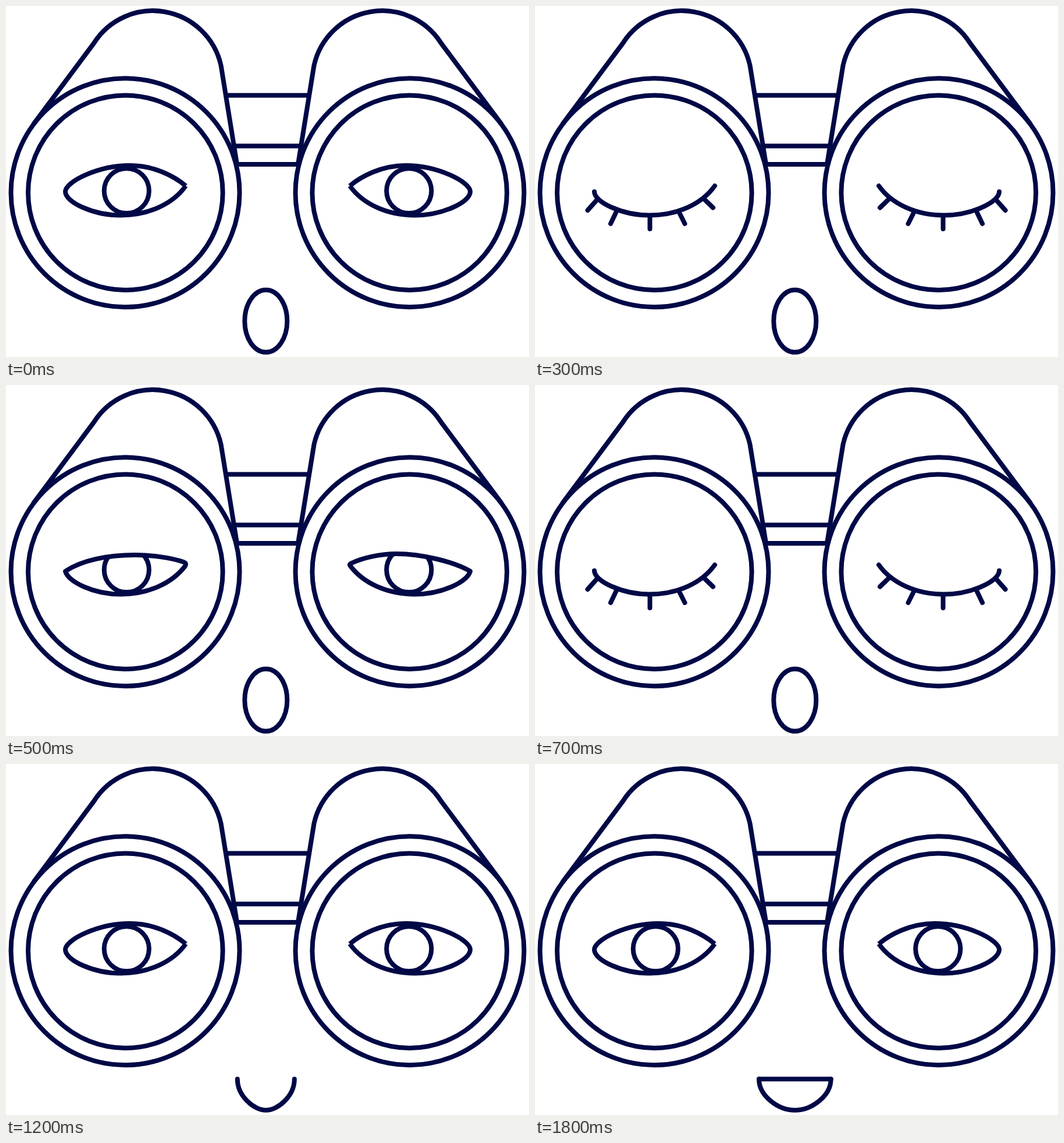
Animation, 899 px wide and 603 px high, one loop 8 s. Source, as an HTML page:

```html
<!DOCTYPE html>
<html lang="en">
<head>
<meta charset="utf-8">
<title>Binoculars</title>
<style>
  html, body { margin: 0; width: 100%; height: 100%; overflow: hidden; background: #fff; }
  svg { display: block; width: 100%; height: 100%; }
  .ink { fill: none; stroke: #000846; stroke-width: 8; stroke-linecap: round; stroke-linejoin: round; }
  .butt { stroke-linecap: butt; }

  /* Every pose is switched hard; 1.25% is 100 ms. */
  .pose { visibility: hidden; animation: 8s step-end infinite; }
  .open { animation-name: open; }
  .half { animation-name: half; }
  .low { animation-name: low; }
  .shut { animation-name: shut; }
  .gasp { animation-name: gasp; }
  .smile1 { animation-name: smile1; }
  .smile2 { animation-name: smile2; }
  .smile3 { animation-name: smile3; }
  .smile4 { animation-name: smile4; }
  .teeth { animation-name: teeth; }

  @keyframes open { 0%, 10%, 100% { visibility: visible } 1.25% { visibility: hidden } }
  @keyframes half { 0%, 2.5%, 7.5%, 100% { visibility: hidden } 1.25%, 6.25% { visibility: visible } }
  @keyframes low { 0%, 3.75%, 6.25%, 8.75%, 100% { visibility: hidden } 2.5%, 5%, 7.5% { visibility: visible } }
  @keyframes shut { 0%, 5%, 10%, 100% { visibility: hidden } 3.75%, 8.75% { visibility: visible } }
  @keyframes gasp { 0% { visibility: visible } 10%, 100% { visibility: hidden } }
  @keyframes smile1 { 0%, 12.5%, 100% { visibility: hidden } 10% { visibility: visible } }
  @keyframes smile2 { 0%, 15%, 100% { visibility: hidden } 12.5% { visibility: visible } }
  @keyframes smile3 { 0%, 17.5%, 100% { visibility: hidden } 15% { visibility: visible } }
  @keyframes smile4 { 0% { visibility: hidden } 17.5%, 100% { visibility: visible } }
  @keyframes teeth { 0% { visibility: hidden } 22.5%, 100% { visibility: visible } }
</style>
</head>
<body>
<svg viewBox="0 0 899 603" preserveAspectRatio="none">
  <defs>
    <g id="tube">
      <circle cx="205" cy="320.7" r="196.5"/>
      <circle cx="205.3" cy="320.7" r="167.3"/>
      <path d="M48 202L151 64A120 120 0 0 1 369.500 102L397 272"/>
    </g>
    <circle id="pupil" cx="207.300" cy="317.500" r="38.600"/>
    <path id="eyeOpen" d="M309 309C290 293 255 274 213 274C158 274 102 302 102 319C102 337 150 359.500 197 359.500C245 359.500 287 340 309 309"/>
    <path id="eyeHalfL" d="M102 320C130 301 175 292 222 292C250 292 285 297 305 304Q311 306 308 311C286 340 245 359.500 197 359.500C150 359.500 107 338 102 320Z"/>
    <path id="eyeHalfR" d="M102 320C129 304 185 290 229 290C257 290 287 297 306 306Q311 308 308 311C286 340 245 359.500 197 359.500C150 359.500 107 338 102 320Z"/>
    <path id="eyeLow" d="M102 320C135 322 170 324 205 324C245 324 280 318 309 309C287 340 245 359.500 197 359.500C150 359.500 107 338 102 320Z"/>
    <path id="eyeShut" d="M102 319C102 337 150 359.500 197 359.500C245 359.500 287 340 309 309"/>
    <path id="lashes" d="M106.500 333L90.500 351M140 353L130 374M197.500 360V383M247 353L257.500 374M291 332L306 346.500"/>
    <clipPath id="clipHalfL"><use href="#eyeHalfL"/></clipPath>
    <clipPath id="clipHalfR"><use href="#eyeHalfR"/></clipPath>
    <clipPath id="clipLow"><use href="#eyeLow"/></clipPath>
    <g id="lowEye">
      <use href="#pupil" clip-path="url(#clipLow)"/>
      <use href="#eyeLow"/>
    </g>
  </defs>

  <g class="ink">
    <use href="#tube"/>
    <use href="#tube" transform="translate(899) scale(-1 1)"/>
    <path class="butt" d="M378 153.500H521M391 240.500H508M397 272H502"/>

    <g class="pose open butt">
      <use href="#pupil"/>
      <use href="#eyeOpen"/>
      <g transform="translate(900) scale(-1 1)">
        <use href="#pupil"/>
        <use href="#eyeOpen"/>
      </g>
    </g>
    <g class="pose half">
      <use href="#pupil" clip-path="url(#clipHalfL)"/>
      <use href="#eyeHalfL"/>
      <g transform="translate(900) scale(-1 1)">
        <use href="#pupil" clip-path="url(#clipHalfR)"/>
        <use href="#eyeHalfR"/>
      </g>
    </g>
    <g class="pose low">
      <use href="#lowEye"/>
      <use href="#lowEye" transform="translate(900) scale(-1 1)"/>
    </g>
    <g class="pose shut">
      <use href="#eyeShut"/>
      <use href="#lashes"/>
      <use href="#eyeShut" transform="translate(900) scale(-1 1)"/>
      <use href="#lashes" transform="translate(899) scale(-1 1)"/>
    </g>

    <ellipse class="pose gasp" cx="446.800" cy="541.300" rx="36.500" ry="53.500"/>
    <path class="pose smile1" d="M410.300 541.300c0 29.500 16.300 53.500 36.500 53.500s36.500-24 36.500-53.500"/>
    <path class="pose smile2" d="M401.300 541.300c0 29.500 25.300 53.500 45.500 53.500s45.500-24 45.500-53.500"/>
    <path class="pose smile3" d="M397.800 541.300c0 29.500 28.800 53.500 49 53.500s49-24 49-53.500"/>
    <path class="pose smile4" d="M385 541.300c0 29.500 33.800 53.500 61.800 53.500s61.800-24 61.800-53.500"/>
    <path class="pose teeth" d="M385 541.300H508.600"/>
  </g>
</svg>
</body>
</html>
```
